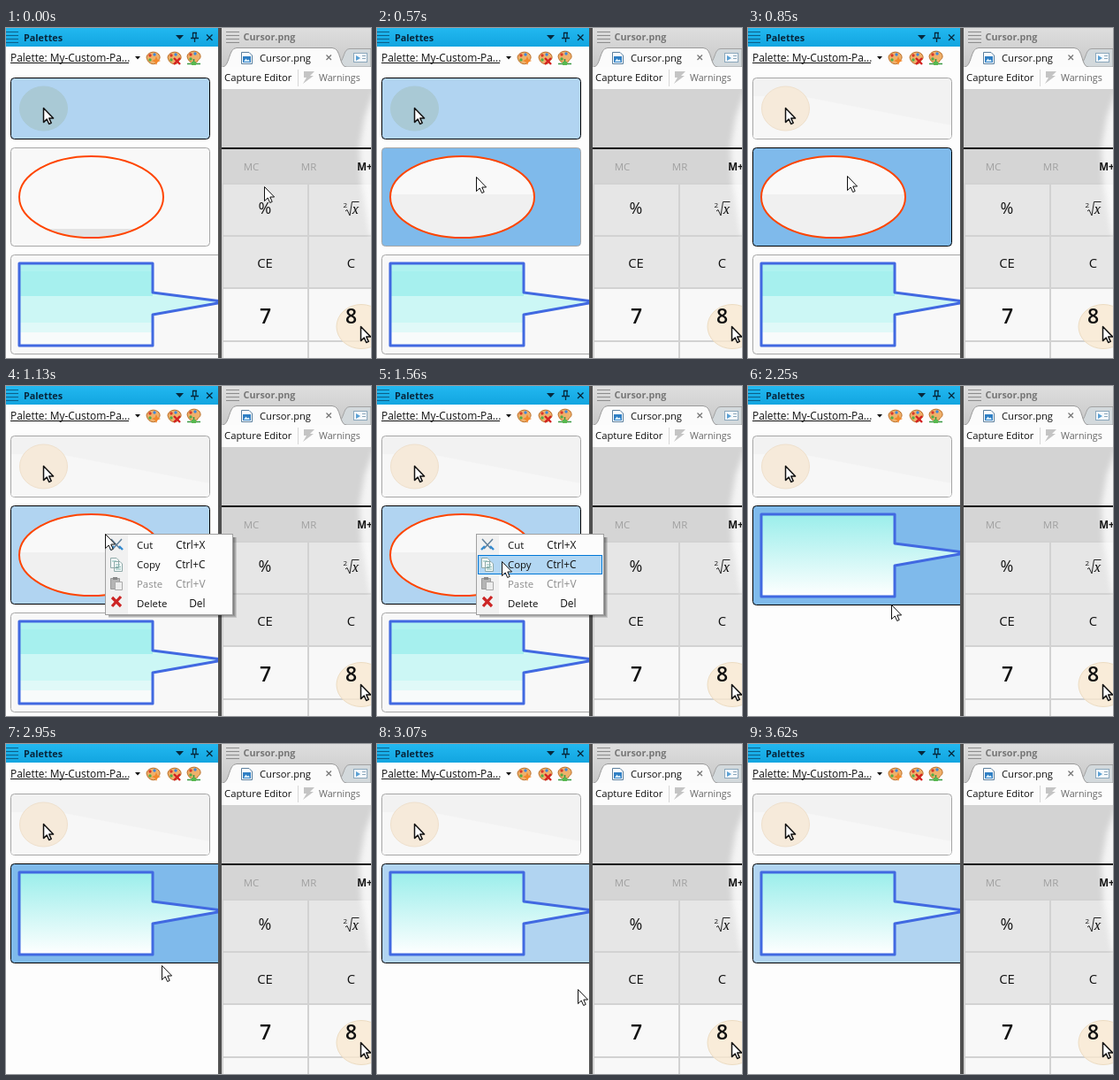
Write an HTML page that moves like this. It is 413 by 373 pixels and loops after 3.87 s.

```html
<!DOCTYPE html>
<html lang="en">
<head>
<meta charset="utf-8">
<title>Palette panel</title>
<style>
html, body { margin: 0; width: 100%; height: 100%; overflow: hidden; background: #fff; }
svg { display: block; width: 413px; height: 373px; }
text { font-family: "Open Sans", "Noto Sans", sans-serif; font-size: 11.2px; fill: #111; }
.b { font-weight: 700; }
.semi { font-weight: 600; }
.mid { text-anchor: middle; }
.end { text-anchor: end; }
.card { stroke: #a6a6a6; }
.card.on { stroke: #000; }
.line { fill: none; stroke: #4169e1; stroke-width: 3; stroke-linejoin: round; }
.bold { stroke-width: 1.5; }
#menu text { font-size: 11.4px; }
#menu .end { font-size: 11.9px; }
#menu .off { fill: #8c8c8c; }
</style>
</head>
<body>
<svg viewBox="0 0 413 373">
  <defs>
    <linearGradient id="bar" x2="0" y2="1"><stop stop-color="#22b8f0"/><stop offset="1" stop-color="#12a5e0"/></linearGradient>
    <linearGradient id="aqua" x2="0" y2="1"><stop stop-color="#9aeeeb"/><stop offset="1" stop-color="#fff"/></linearGradient>
    <linearGradient id="top" x2="0" y2="1"><stop stop-color="#dedede"/><stop offset="1" stop-color="#c8c8c8"/></linearGradient>
    <filter id="soft" x="-50%" width="200%"><feGaussianBlur stdDeviation="3"/></filter>
    <clipPath id="oval"><ellipse cx="96.500" cy="191" rx="81" ry="45.500"/></clipPath>
    <path id="arrow" d="M.5.5V16.6L4.2 13L6.7 18.5L9.2 17.4L6.8 12H11.6Z" fill="#fff" stroke="#111" stroke-linejoin="round"/>
    <path id="bubble" d="M15 266H166V299L248 309.500L166 324V359H15Z"/>
    <g id="paint">
      <path d="M1 7C2 1 11-1 15 4C18 9 14 10 13 12C11 17 2 15 1 7Z" fill="#f0b06a" stroke="#b96d25"/>
      <circle cx="5" cy="5" r="1.7" fill="#d83a2b"/><circle cx="10" cy="4" r="1.7" fill="#3f87d9"/><circle cx="5" cy="10" r="1.7" fill="#55ac45"/>
    </g>
  </defs>

  <!-- left panel -->
  <rect width="240" height="373" fill="#fdfdfd"/>
  <rect width="240" height="21" fill="url(#bar)"/>
  <path d="M0 4.500H14M0 8.500H14M0 12.500H14M0 16.500H14" stroke="#0c5f88"/>
  <text class="b" x="20" y="15" style="font-size:10.8px;fill:#07263c">Palettes</text>
  <path d="M192 8H201L196.500 13Z" fill="#06283c"/>
  <path d="M211 5.500H216M211.500 5V11M215 5V11M209 11.500H218M213.500 12V16M227 7.500L233.500 14M233.500 7.500L227 14" fill="none" stroke="#06283c" stroke-width="1.3"/>
  <text x="5" y="38" style="font-size:11.9px">Palette: My-Custom-Pa...</text>
  <path d="M5 39.500H139" stroke="#111"/>
  <path d="M146 32H152L149 35.500Z" fill="#111"/>
  <use href="#paint" x="158" y="26"/>
  <path d="M170 32L171.500 35.500L175 37L171.500 38.500L170 42L168.500 38.500L165 37L168.500 35.500Z" fill="#f2882b"/>
  <use href="#paint" x="182" y="26"/>
  <path d="M190 34L197 41M197 34L190 41" stroke="#d42222" stroke-width="2.4"/>
  <use href="#paint" x="204" y="25"/>
  <path d="M205 40.500H220M212.500 35V40" stroke="#3b9a45" stroke-width="1.6"/>
  <rect x="210" y="38" width="5" height="4" fill="#58b84f"/>

  <rect id="card1" class="card" x="5.500" y="56.500" width="225" height="69" rx="4"/>
  <path id="shade" d="M60 77L230 110V122Q230 125 227 125H9Q6 125 6 122V77Z" fill="#f7f7f7"/>
  <ellipse id="spot" cx="42.500" cy="91" rx="27" ry="25"/>
  <use href="#arrow" class="bold" x="42" y="90"/>

  <g id="shape">
    <rect id="card2" class="card" x="5.500" y="135.500" width="225" height="111" rx="4"/>
    <g clip-path="url(#oval)">
      <rect x="14" y="144" width="166" height="95" fill="#f9f9f9"/>
      <rect id="band" x="14" width="166" height="60"/>
    </g>
    <ellipse cx="96.500" cy="191" rx="81.500" ry="46" fill="none" stroke="#ff4500" stroke-width="2"/>
  </g>
  <g id="call">
    <rect id="card3" class="card" x="5.500" y="256.500" width="260" height="112" rx="4"/>
    <g id="bands"></g>
    <use id="fade" href="#bubble" fill="url(#aqua)"/>
    <use href="#bubble" class="line"/>
  </g>

  <!-- right window -->
  <rect x="240" width="173" height="373" fill="#d2d2d2"/>
  <rect x="244" width="169" height="44" fill="url(#top)"/>
  <path d="M249 4.500H264M249 8.500H264M249 12.500H264M249 16.500H264" stroke="#8c8c8c"/>
  <text class="b" x="268.500" y="14" style="font-size:10.8px;fill:#777">Cursor.png</text>
  <path d="M378 39C383 34 382 23.500 389 23.500H413V44H384" fill="#d3d9dc" stroke="#a2a2a2"/>
  <path d="M244 44.500C254 44 251 22.500 261 22.500H369C380 22.500 376 44 386 44.500" fill="#fbfbfb" stroke="#999"/>
  <rect x="244" y="44" width="169" height="25" fill="#fcfcfc"/>
  <path d="M266.500 27.500H275L278.500 31V40.500H266.500Z" fill="#fff" stroke="#5b7f9d"/>
  <path d="M268 32H277V39H268Z" fill="#2f7fc4"/>
  <path d="M269 38L271.500 34.500L273 36.500L274.500 35.500L276 38Z" fill="#d9eefb"/>
  <text x="287" y="38">Cursor.png</text>
  <path d="M362.500 30.500L368 36M368 30.500L362.500 36" stroke="#777" stroke-width="1.3"/>
  <rect x="393.500" y="28.500" width="15" height="10" fill="#f4f8fb" stroke="#8ca8bc"/>
  <path d="M396 31V37L401 34Z" fill="#5aa0d4"/><path d="M403 31.500H407M403 34.500H407" stroke="#8ca8bc"/>
  <text x="247" y="60" style="font-size:11.3px">Capture Editor</text>
  <path d="M330.500 47V66" stroke="#d6d6d6"/>
  <path d="M337 49H349L344 54H348L336 63L340 56H337Z" fill="#c4c4c4"/>
  <text x="354" y="60" style="font-size:10.7px;fill:#666">Warnings</text>
  <g id="keys"></g>
  <path d="M416 72L406 100L400 134L402 176L412 235H422V72Z" fill="#fff" opacity=".75" filter="url(#soft)"/>
  <path d="M244 136H413" stroke="#111" stroke-width="2"/>
  <g id="labels"></g>
  <path d="M384 207L386 205.500L389 212L391.500 196.500H399.500" fill="none" stroke="#222"/>
  <text x="381.500" y="203" style="font-size:8px">2</text>
  <text x="391.500" y="210" style="font-size:14px;font-family:'Noto Serif',serif;font-style:italic">x</text>
  <ellipse cx="402" cy="337.500" rx="28" ry="25" fill="#fae8cf" fill-opacity=".75" stroke="#ecdcc2"/>
  <text class="semi mid" x="390.500" y="334" style="font-size:23px">8</text>
  <use href="#arrow" class="bold" x="401" y="337"/>
  <path d="M242 0V373" stroke="#505050" stroke-width="4"/>

  <g id="menu">
    <g id="drop"></g>
    <rect x="112.500" y="167.500" width="144" height="91" fill="#fcfcfc" stroke="#a0a0a0"/>
    <rect x="113" y="168" width="25" height="90" fill="#f1f1f1"/>
    <rect id="pick" x="114.500" width="140" height="21" fill="#b3d7f3" stroke="#0078d7"/>
    <g id="rows"></g>
    <path d="M119 173L129 184M131 173L121 184" stroke="#62819b" stroke-width="1.5"/>
    <path d="M118 185L122 181M128 181L132 185" stroke="#348bd0" stroke-width="2.4"/>
    <path d="M118.500 194.500H125L127.500 197V205.500H118.500ZM122.500 198.500H129L131.500 201V209.500H122.500Z" fill="#f5fafa" stroke="#8fa9a8"/>
    <path d="M124 202H129M124 204.500H130M124 207H130M120 198H125" stroke="#82b9b2"/>
    <path d="M118.500 217.500H128.500V229.500H118.500Z" fill="#b5b5b5" stroke="#999"/>
    <path d="M121 216H126V219H121Z" fill="#888"/>
    <path d="M123.500 221.500H131.500V230.500H123.500Z" fill="#ededed" stroke="#aaa"/>
    <path d="M120 239L130 249M130 238L120 249" stroke="#cc2424" stroke-width="3.2"/>
  </g>
  <use id="mouse" href="#arrow"/>
</svg>
<script>
const $ = id => document.getElementById(id);
const show = (id, on) => $(id).setAttribute("visibility", on ? "inherit" : "hidden");
const fill = (id, c) => $(id).setAttribute("fill", c);

const rect = (x, y, w, h, c) => `<rect x="${x}" y="${y}" width="${w}" height="${h}" fill="${c}"/>`;
const label = (s, x, y, size, cls = "", c = "#111") =>
  `<text class="mid ${cls}" x="${x}" y="${y}" style="font-size:${size}px;fill:${c}">${s}</text>`;

// calculator
let keys = rect(244, 69, 169, 66, "#d3d3d3") + rect(244, 136, 169, 39, "#d5d5d5");
[[177, 57, "#e6e6e6"], [236, 57, "#e6e6e6"], [295, 58, "#f8f8f8"], [355, 18, "#f8f8f8"]]
  .forEach(([y, h, c]) => keys += rect(246, y, 95, h, c) + rect(343, y, 70, h, c));
$("keys").innerHTML = keys;
$("labels").innerHTML = label("MC", 277.5, 161, 11.5, "", "#a0a0a0") + label("MR", 342.5, 161, 11.5, "", "#a0a0a0") +
  label("M+", 406, 161, 11.5, "b") + label("%", 293, 210, 18) + label("CE", 293, 271, 14.8) +
  label("C", 390.5, 271, 14.8) + label("7", 293.5, 334, 23, "semi");

$("bands").innerHTML = [[266, 9, "#aff2f0"], [275, 28, "#a6f0ee"], [303, 30, "#ccf7f5"], [333, 11, "#e0f9f8"], [344, 15, "#f8fbfb"]]
  .map(([y, h, c]) => rect(15, y, 151, h, c)).join("") +
  `<path d="M166 299L248 309.500L166 324Z" fill="#ccf7f5"/>`;

// stepped menu shadow
$("drop").innerHTML = [1, 2, 3, 4].map(i => rect(116, 171, 141 + i, 87 + i, "#0002")).join("");
$("rows").innerHTML = [["Cut", "Ctrl+X"], ["Copy", "Ctrl+C"], ["Paste", "Ctrl+V"], ["Delete", "Del"]]
  .map(([name, key], i) => {
    const y = 184 + 22 * i, off = i == 2 ? "off" : "";
    return `<text class="${off}" x="148" y="${y}">${name}</text><text class="end ${off}" x="225.500" y="${y}">${key}</text>`;
  }).join("");

const LOOP = 3870, GONE = [-40, -40];
const CHOSEN = "#b1d4f1", HOT = "#7fbaeb";
// time, pointer position
const path = [
  [0, 292, 179], [120, 289, 177], [270, 212, 170], [420, 135, 170], [570, 112, 168], [850, 112, 167],
  [1410, 113, 168], [1560, 141, 198], [1690, 152, 224], [1840, 160, 242], [1970, 162, 247],
  [2520, 163, 247], [2950, 176, 250], [3070, 227, 277], [3220, 298, 323], [3340, 360, 362],
  [3480, 367, 369], [3620, ...GONE]
];
// time, highlighted menu row
const picks = [[0, -1], [1560, 1], [1690, 2], [1840, 3]];
const at = (table, t) => table.findLast(step => step[0] <= t);

function draw(t) {
  const [, x, y] = at(path, t);
  const second = t >= 850, gone = t >= 2250;
  const hot = (t >= 270 && t < 1130) || (gone && t < 3070);

  $("mouse").setAttribute("transform", `translate(${x} ${y})`);
  $("card1").classList.toggle("on", !second);
  fill("card1", second ? "#f2f2f2" : CHOSEN);
  show("shade", second);
  fill("spot", second ? "#f6eada" : "#a9c9d5");
  $("spot").setAttribute("stroke", second ? "#efe0cc" : "#a9c9d5");

  show("shape", !gone);
  $("card2").classList.toggle("on", second);
  fill("card2", hot ? HOT : second ? CHOSEN : "#f8f8f8");
  $("band").setAttribute("y", t < 270 ? 227 : 188);
  fill("band", t < 270 ? "#e3e3e3" : "#f0f0f0");

  $("call").setAttribute("transform", `translate(0 ${gone ? -121 : 0})`);
  $("card3").classList.toggle("on", gone);
  fill("card3", !gone ? "#f8f8f8" : hot ? HOT : CHOSEN);
  show("fade", gone);

  const open = t >= 1130 && !gone, row = at(picks, t)[1];
  show("menu", open);
  show("pick", open && row >= 0);
  $("pick").setAttribute("y", 169.5 + 22 * row);
}

const start = performance.now();
function tick() {
  draw((performance.now() - start) % LOOP);
  requestAnimationFrame(tick);
}
tick();
</script>
</body>
</html>
```
